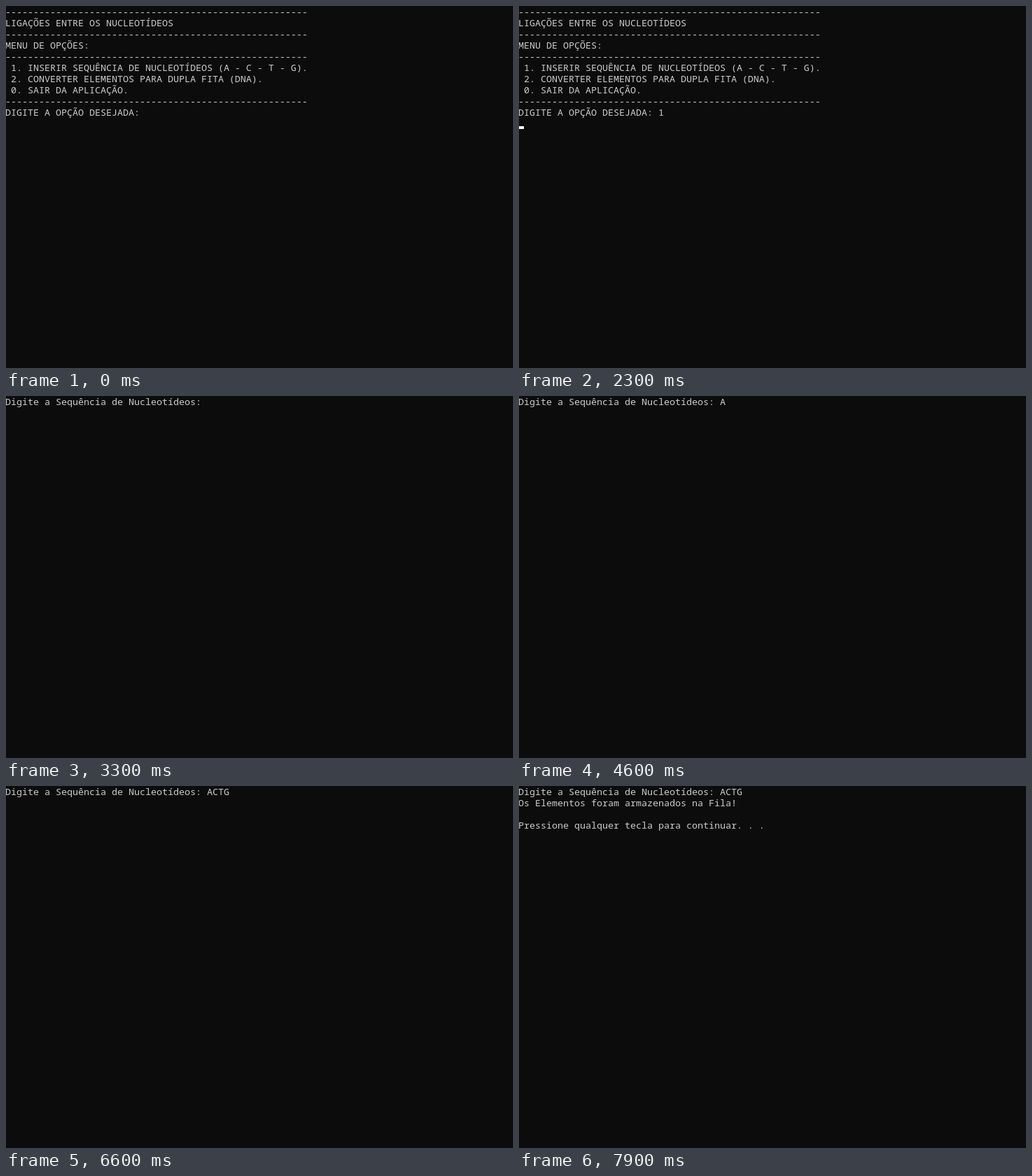
Recreate the animation shown at these times as an HTML page. Size 724 px wide and 518 px high, loop 8000 ms.

```html
<!DOCTYPE html>
<html lang="pt">
<head>
<meta charset="utf-8">
<title>Terminal</title>
<style>
  html, body { margin: 0; width: 100%; height: 100%; overflow: hidden; background: #0c0c0c; }
  #screen {
    position: absolute; left: -1px; top: 0; margin: 0;
    font: 13.3333px/16px "Noto Sans Mono", "DejaVu Sans Mono", monospace;
    color: #ccc; white-space: pre;
  }
  #cursor { position: absolute; left: -1px; top: 12px; width: 8px; height: 4px; background: #fff; }
</style>
</head>
<body>
<pre id="screen"></pre>
<div id="cursor"></div>
<script>
  const LOOP = 8000, CELL = 8, ROW = 16;
  const rule = "-".repeat(54);
  const menu = [
    rule,
    "LIGAÇÕES ENTRE OS NUCLEOTÍDEOS",
    rule,
    "MENU DE OPÇÕES:",
    rule,
    " 1. INSERIR SEQUÊNCIA DE NUCLEOTÍDEOS (A - C - T - G).",
    " 2. CONVERTER ELEMENTOS PARA DUPLA FITA (DNA).",
    " 0. SAIR DA APLICAÇÃO.",
    rule,
    "DIGITE A OPÇÃO DESEJADA: "
  ].join("\n");
  const prompt = "Digite a Sequência de Nucleotídeos: ";
  const done = "\nOs Elementos foram armazenados na Fila!\n\nPressione qualquer tecla para continuar. . . ";

  // Terminal contents from each start time; the cursor sits at the end.
  const states = [
    [0, menu],
    [1000, menu + "1"],
    [2000, menu + "1\n"],
    [2500, prompt],
    [4100, prompt + "A"],
    [4900, prompt + "AC"],
    [5300, prompt + "ACT"],
    [5700, prompt + "ACTG"],
    [6900, prompt + "ACTG" + done]
  ];
  // Spans in which the cursor is lit.
  const lit = [[300, 800], [1000, 1500], [2000, 3000], [3500, 4500], [4900, 6200], [6800, 7400]];

  const screen = document.getElementById("screen");
  const cursor = document.getElementById("cursor");
  let shown = null;

  function show(text) {
    if (text === shown) return;
    shown = text;
    screen.textContent = text;
    const lines = text.split("\n");
    const col = lines[lines.length - 1].length;
    cursor.style.transform = `translate(${col * CELL}px, ${(lines.length - 1) * ROW}px)`;
  }

  const start = performance.now();
  function draw() {
    const t = (performance.now() - start) % LOOP;
    show(states.filter(([from]) => from <= t).pop()[1]);
    cursor.style.visibility = lit.some(([on, off]) => t >= on && t < off) ? "visible" : "hidden";
    requestAnimationFrame(draw);
  }
  draw();
</script>
</body>
</html>
```
